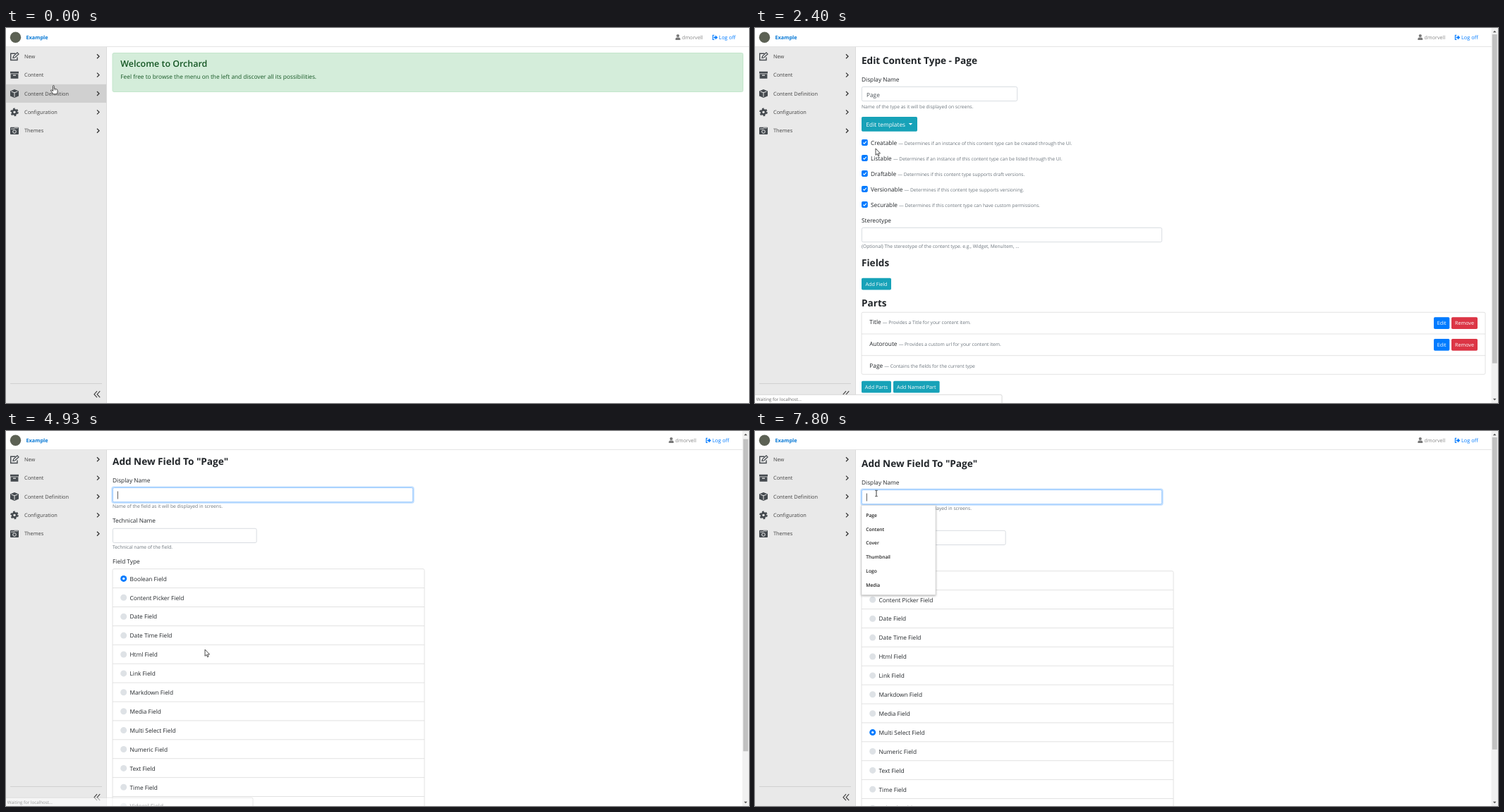
These frames come from a looping animation (1053x532 px, 8000 ms). An HTML page:

```html
<!DOCTYPE html>
<html lang="en">
<head>
<meta charset="utf-8">
<title>Adding a field to a content type</title>
<style>
html, body { margin: 0; width: 100%; height: 100%; overflow: hidden; background: #fff; }
svg { display: block; width: 100vw; height: 100vh; }
text { font-family: "Open Sans", "Noto Sans", sans-serif; text-rendering: geometricPrecision; white-space: pre; }
</style>
</head>
<body>
<svg id="stage" viewBox="0 0 1053 532"></svg>
<script>
const LOOP = 8000, STEPS_PER_MS = 0.015;
const BLUE = '#007bff', TEAL = '#17a2b8', GRAY = '#6c757d', RED = '#dc3545', GREEN = '#28a745',
  INK = '#212529', ICON = '#454a4f';
const BODY = 8.3, SMALL = 6.68, MENU = 7.36, BTN = 7.2, TITLE = 13.6;

// Tracks are rows of [step, ...values].
const CURSOR = [[3, 67.5, 81.5], [8, 75, 113], [12, 75, 113], [15, 237.7, 123], [18, 237.7, 123],
  [24, 171, 171], [40, 171, 171], [45, 271, 316], [48, 271, 316], [52, 276, 232], [57, 173, 309],
  [66, 173, 309], [69, 282, 310], [75, 282, 310], [84, 180, 338], [88, 180, 338], [94, 176, 480],
  [100, 176, 480], [101, 197, 409], [103, 197, 409], [113, 172, 88.5]];
const POINTER = [[0, 'hand'], [13, 'arrow'], [24, 'hand'], [35, 'arrow'], [57, 'hand'], [67, 'arrow'],
  [94, 'hand'], [101, 'arrow'], [112, 'beam']];
const MENU_OPEN = [[2, 0], [7, 44]];
const STATUS = [[5, 0], [7, 1], [20, 1], [23, 0], [24, 0], [25, 1], [40, 1], [43, 0], [59, 0], [61, 1],
  [72, 1], [73, .8], [74, .6], [76, 0]];
const TYPE_SCROLL = [[46, 0], [47, 14], [48, 35], [49, 49], [50, 54]];
const FIELD_SCROLL = [[73, 0], [74, 3], [75, 20], [76, 40], [77, 55], [79, 75], [82, 85.5],
  [102, 85.5], [104, 66], [106, 40], [108, 18], [111, 0]];
const PAGES = [[0, 0], [12, 1], [35, 2], [67, 3]];

const smooth = u => u * u * (3 - 2 * u);
function track(rows, k, ease = u => u) {
  const i = rows.findIndex(r => r[0] > k);
  if (i === 0) return rows[0].slice(1);
  if (i < 0) return rows.at(-1).slice(1);
  const [a, b] = [rows[i - 1], rows[i]], u = ease((k - a[0]) / (b[0] - a[0]));
  return a.slice(1).map((v, j) => v + (b[j + 1] - v) * u);
}
const pick = (rows, k) => rows.filter(r => r[0] <= k).at(-1)[1];

// Drawing helpers; text is placed by its vertical centre.
const text = (x, y, s, size = BODY, fill = INK, extra = '') =>
  `<text x="${x}" y="${y + size * .36}" font-size="${size}" fill="${fill}" ${extra}>${s}</text>`;
const rect = (x, y, w, h, fill, extra = '') =>
  `<rect x="${x}" y="${y}" width="${w}" height="${h}" fill="${fill}" ${extra}/>`;
const path = (d, fill = ICON, extra = '') => `<path d="${d}" fill="${fill}" ${extra}/>`;
const line = (d, stroke, w = 1, extra = '') => path(d, 'none', `stroke="${stroke}" stroke-width="${w}" ${extra}`);
const circle = (x, y, r, fill, extra = '') => `<circle cx="${x}" cy="${y}" r="${r}" fill="${fill}" ${extra}/>`;
const group = (x, y, s, extra = '') => `<g transform="translate(${x} ${y})" ${extra}>${s}</g>`;
const title = (y, s) => text(151, y, s, TITLE, INK, 'font-weight="700"');
const hint = (y, s) => text(151, y, s, SMALL, GRAY);
const button = (x, y, w, h, s, fill, size = BODY) => rect(x, y, w, h, fill, 'rx="1.7"') +
  text(x + w / 2, y + h / 2 + .3, s, size, '#fff', 'text-anchor="middle"');
const small = (x, y, w, s, fill) => button(x, y, w, 16.8, s, fill, BTN);
const noted = (x, y, label, note) =>
  text(x, y, `${label} <tspan font-size="${SMALL}" fill="${GRAY}">— ${note}</tspan>`);
function input(x, y, w, focus = 0) {
  return rect(x - .7, y - .7, w + 1.4, 22.4, 'none',
      `rx="2.6" stroke="${BLUE}" stroke-opacity="${.25 * focus}" stroke-width="1.8"`) +
    rect(x + .4, y + .4, w - .8, 20.2, '#fff',
      `rx="2" stroke="${focus > .5 ? '#80bdff' : '#ced4da'}" stroke-width=".8"`);
}
const caret = (x, y) => line(`M${x} ${y - 5.5}v11`, '#333', .8);
function list(y, w, pitch, rows) {
  let d = '';
  for (let i = 1; i < rows; i++) d += `M151 ${y + pitch * i}h${w}`;
  return d;
}
const panel = (y, w, h, dividers) =>
  rect(151, y, w, h, '#fff', 'rx="2" stroke="#dfdfdf" stroke-width=".9"') + line(dividers, '#dfdfdf', .9);

const ICONS = [
  line('M1.5-4H-5.3V5.2H4V1.2', ICON, 1.4) + line('M-2 2.2L-1.4-.2 4-5.4 6-3.4.6 1.7z', ICON, 1.2),
  path('M-6-5H6v2.8H-6zM-5.4-1.4H5.4V5H-5.4zM-2-.2v1.2H2V-.2z', ICON, 'fill-rule="evenodd"'),
  path('M0-6L6-3.6V3.6L0 6-6 3.6V-3.6z') + line('M-4.5-3L0-1.2 4.5-3M0-1.2V4.8', '#e9e9e9', 1),
  circle(0, 0, 3, 'none', `stroke="${ICON}" stroke-width="2.6"`) +
    circle(0, 0, 4.6, 'none', `stroke="${ICON}" stroke-width="2.4" stroke-dasharray="2.5 2.317"`),
  rect(-6, -5, 12, 10.4, ICON, 'rx="1"') + line('M-5-2.6H-1L0-3.8H5', '#e9e9e9', .9) +
    circle(0, 1.3, 2.3, 'none', 'stroke="#e9e9e9" stroke-width="1"')
];
const ITEMS = ['New', 'Content', 'Content Definition', 'Configuration', 'Themes'];

function sidebar(k, page) {
  const shift = page < 2 ? track(MENU_OPEN, k, smooth)[0] : 0, open = shift > 0;
  let s = rect(0, 27, 142, 505, '#e9e9e9') + line('M142.5 27V532', '#dcdcdc');
  if (open) {
    const onTypes = k >= 6;
    s += rect(0, 79.8, 142, 26.2 + shift, '#dedede') + rect(0, 79.8, 1.4, 26.2 + shift, '#b4b4b4');
    s += `<svg x="0" y="106" width="142" height="${shift}">` +
      (onTypes ? rect(0, 0, 142, 22, '#d0d0d0') : '') + (page ? rect(0, 0, 1.6, 22, BLUE) : '') +
      text(26, 11, 'Content Types', MENU, '#333', page ? 'font-weight="600"' : '') +
      text(26, 33, 'Content Parts', MENU, '#444') + '</svg>';
  }
  if (k < 6) s += rect(0, 79.8, 142, 26.2, '#d0d0d0');
  ITEMS.forEach((name, i) => {
    const y = 40.3 + 26.35 * i + (i > 2 ? shift : 0), active = open && i === 2;
    s += group(12, y, ICONS[i]) +
      text(26, y, name, MENU, '#444', active ? 'font-weight="600"' : '') +
      group(130.5, y, line(active ? 'M-2.8-1.3L0 1.5 2.8-1.3' : 'M-1.5-3L1.5 0-1.5 3', '#333', 1.3));
  });
  return s + line('M6 504.5H136', '#d0d0d0') + line('M129 515.2l-4 4.5 4 4.5M133.2 515.2l-4 4.5 4 4.5', '#444', 1.2);
}

function header(page) {
  const account = circle(952.2, 11, 2.1, '#777') + path('M948.8 17v-1.6q0-2 2-2h2.8q2 0 2 2V17z', '#777') +
    text(958, 13.8, 'dmorvell', BTN, '#888') +
    line('M1003.8 10.3h-2v6.2h2', BLUE, 1.1) + path('M1003.2 12.4h2.2v-2.2l3.3 3.2-3.3 3.2v-2.2h-2.2z', BLUE) +
    text(1010.3, 13.8, 'Log off', 7.4, BLUE);
  return rect(0, 0, 1053, 27, '#fff') + line('M0 26.5H1053', '#e4e4e4') + circle(13.5, 13.2, 7.7, '#5c6154') +
    text(28.5, 13.4, 'Example', 7.3, '#0a7ad6', 'font-weight="700"') + group(page > 1 ? -9.4 : 0, 0, account);
}

const welcome = () => rect(151, 35.5, 893.5, 55, '#d4edda', 'rx="2" stroke="#c3e6cb"') +
  text(162.3, 50.8, 'Welcome to Orchard', 12.45, '#155724', 'font-weight="600"') +
  text(162.3, 69.2, 'Feel free to browse the menu on the left and discover all its possibilities.', BODY, '#155724');

function contentTypes(k) {
  const focus = track([[28, 1], [31, 0]], k)[0], hover = k >= 24;
  let s = title(46.7, 'Content Types') + rect(151, 62, 894, 29, '#e9ecef') +
    button(159.7, 66, 76.6, 21, 'Create new type', BLUE) + input(922, 66, 110, focus) +
    text(928.8, 77, 'Filter', BODY, GRAY) + (k < 22 ? caret(929.4, 77) : '') +
    panel(100.5, 893.5, 92, list(100.5, 893.5, 30.7, 3));
  ['Link Menu Item', 'Menu', 'Page'].forEach((name, i) => {
    const y = 107.3 + 30.7 * i, over = hover && i === 2;
    s += text(162.3, y + 7, name, BODY, over ? '#0056b3' : BLUE, over ? 'text-decoration="underline"' : '') +
      small(966.3, y, 41.7, 'List Items', GRAY) + small(1010.5, y, 22.7, 'Edit', BLUE);
  });
  return s + rect(225, 109.3, 40, 9.8, TEAL, 'rx="4.9"') +
    text(245, 114.3, 'MenuItem', 6.2, '#fff', 'font-weight="700" text-anchor="middle"') +
    small(896, 168.7, 67.7, 'Create New Page', GREEN);
}

const OPTIONS = [
  ['Creatable', 'Determines if an instance of this content type can be created through the UI.'],
  ['Listable', 'Determines if an instance of this content type can be listed through the UI.'],
  ['Draftable', 'Determines if this content type supports draft versions.'],
  ['Versionable', 'Determines if this content type supports versioning.'],
  ['Securable', 'Determines if this content type can have custom permissions.']];
const PARTS = [
  ['Title', 'Provides a Title for your content item.'],
  ['Autoroute', 'Provides a custom url for your content item.'],
  ['Page', 'Contains the fields for the current type']];

function editType(k) {
  let s = title(46.4, 'Edit Content Type - Page') + text(151, 72.8, 'Display Name') + input(151, 83, 221) +
    text(158, 94.7, 'Page', BODY, '#495057') + hint(111.6, 'Name of the type as it will be displayed on screens.') +
    rect(151, 126, 79, 20.8, TEAL, 'rx="1.7"') + text(157.5, 136.8, 'Edit templates', BODY, '#fff') +
    path('M217.8 135h5.4l-2.7 2.8z', '#fff');
  OPTIONS.forEach(([label, note], i) => {
    const y = 162.5 + 22 * i;
    s += rect(151, y - 4.4, 8.8, 8.8, BLUE, 'rx="1.8"') +
      line(`M153.3 ${y + .1}l1.6 1.6 2.9-3.3`, '#fff', 1.1) + noted(164, y + .3, label, note);
  });
  s += text(151, 272.6, 'Stereotype') + input(151, 283, 426) +
    hint(310, '(Optional) The stereotype of the content type. e.g., Widget, MenuItem, ...') +
    title(333, 'Fields') + small(151, 354.7, 42, 'Add Field', k >= 57 ? '#138496' : TEAL) +
    title(390.2, 'Parts') + panel(403.3, 884, 88, list(403.3, 884, 30.7, 3));
  PARTS.forEach(([label, note], i) => {
    const y = 417.2 + 30.7 * i;
    s += noted(162.3, y, label, note);
    if (i < 2) s += small(962, y - 7, 22.3, 'Edit', BLUE) + small(987, y - 7, 37, 'Remove', RED);
  });
  return s + small(151, 500.8, 42, 'Add Parts', TEAL) + small(196, 500.8, 65.6, 'Add Named Part', TEAL) +
    button(151, 526.7, 32, 20.8, 'Save', BLUE) + button(185.5, 526.7, 39.5, 20.8, 'Delete', RED);
}

const FIELDS = ['Boolean', 'Content Picker', 'Date', 'Date Time', 'Html', 'Link', 'Markdown', 'Media',
  'Multi Select', 'Numeric', 'Text', 'Time', 'Vidorel'];
const SUGGESTIONS = ['Page', 'Content', 'Cover', 'Thumbnail', 'Logo', 'Media'];

function addField(k) {
  const chosen = k < 89 ? 0 : 8;
  const focus = track([[88, 1], [89, 0], [113, 0], [116, 1]], k)[0];
  const ring = track([[88, 0], [90, 1], [113, 1], [115, 0]], k)[0];
  let s = title(46.4, 'Add New Field To "Page"') + text(151, 73, 'Display Name') + input(151, 83.1, 426, focus) +
    (k < 80 || k >= 114 ? caret(158.4, 94) : '') + hint(110, 'Name of the field as it will be displayed in screens.') +
    text(151, 130.5, 'Technical Name') + input(151, 140.9, 204.5) + hint(167.6, 'Technical name of the field.') +
    text(151, 188, 'Field Type') + panel(198.7, 442, 349.7, list(198.7, 442, 26.9, 13));
  FIELDS.forEach((name, i) => {
    const y = 212.4 + 26.9 * i, on = i === chosen;
    if (on && ring) s += circle(166.7, y, 5.9, BLUE, `opacity="${.25 * ring}"`);
    s += circle(166.7, y, 4.5, on ? BLUE : '#dee2e6') + (on ? circle(166.7, y, 1.7, '#fff') : '') +
      text(175.5, y + .3, name + ' Field');
  });
  s += button(151, 558.2, 32, 20.8, 'Save', k >= 94 && k <= 101 ? '#0069d9' : BLUE) +
    button(185.5, 558.2, 39.5, 20.8, 'Cancel', GRAY);
  if (k >= 116) {
    s += rect(151, 105.3, 105, 127.2, '#fff', 'stroke="#d4d4d4" stroke-width=".6" style="filter:drop-shadow(0 1px 1.5px #0005)"');
    SUGGESTIONS.forEach((name, i) => s += text(157.3, 119.5 + 19.75 * i, name, 6.7, '#222', 'font-weight="600"'));
  }
  return s;
}

function scrollbar(scroll, max) {
  const ratio = 532 / (532 + max);
  return rect(1043.6, 0, 9.4, 532, '#f1f1f1') + rect(1044.8, 9 + scroll * 514 / (532 + max), 7, 514 * ratio, '#c1c1c1') +
    path('M1045.9 6.3h4.6l-2.3-2.6zM1045.9 525.7h4.6l-2.3 2.6z', '#505050');
}

function status(k) {
  const alpha = track(STATUS, k)[0], w = k < 11 ? 210 : 350;
  return alpha ? `<g opacity="${alpha}">` + rect(-3, 520.2, w + 3, 16, '#fff', 'rx="2" stroke="#d0d0d0" stroke-width=".8"') +
    text(1.8, 526.5, 'Waiting for localhost...', 6.2, '#666') + '</g>' : '';
}

const outline = 'stroke="#222" stroke-width=".8" stroke-linejoin="round"';
const CURSORS = {
  arrow: path('M0 0V9.3L2.1 7.4 3.6 10.7 5 10 3.6 6.9H6.5z', '#fff', outline),
  hand: path('M-1 1q0-1 .9-1t.9 1V4.6q1.4-.6 1.8.4 1.3-.3 1.6.6 1.3 0 1.3 1.2V9.5L4.5 12.3H-.6L-3.9 7.6q-.4-1.2.7-1.2L-1 8z', '#fff', outline) +
    line('M.9 4.8v2M2.7 5.2v2', '#222', .6),
  beam: line('M-1.7-4.2H-.4L0-3.8.4-4.2H1.7M0-3.8V3.8M-1.7 4.2H-.4L0 3.8.4 4.2H1.7', '#222', .9)
};

function scene(k) {
  const page = pick(PAGES, k);
  const max = [0, 0, 54, 85.5][page];
  const scroll = max && track(page === 2 ? TYPE_SCROLL : FIELD_SCROLL, k)[0];
  const content = [welcome, contentTypes, editType, addField][page](k);
  const [x, y] = track(CURSOR, k, smooth);
  return rect(0, 0, 1053, 532, '#fff') + group(0, -scroll, content) + sidebar(k, page) + header(page) +
    (max ? scrollbar(scroll, max) : '') + status(k) + group(x, y, CURSORS[pick(POINTER, k)]);
}

const stage = document.getElementById('stage'), start = performance.now();
let shown = -1;
function draw(now) {
  const k = Math.floor((Math.max(0, now - start) % LOOP) * STEPS_PER_MS + .06);
  if (k !== shown) stage.innerHTML = scene(shown = k);
  requestAnimationFrame(draw);
}
draw(start);
</script>
</body>
</html>
```
